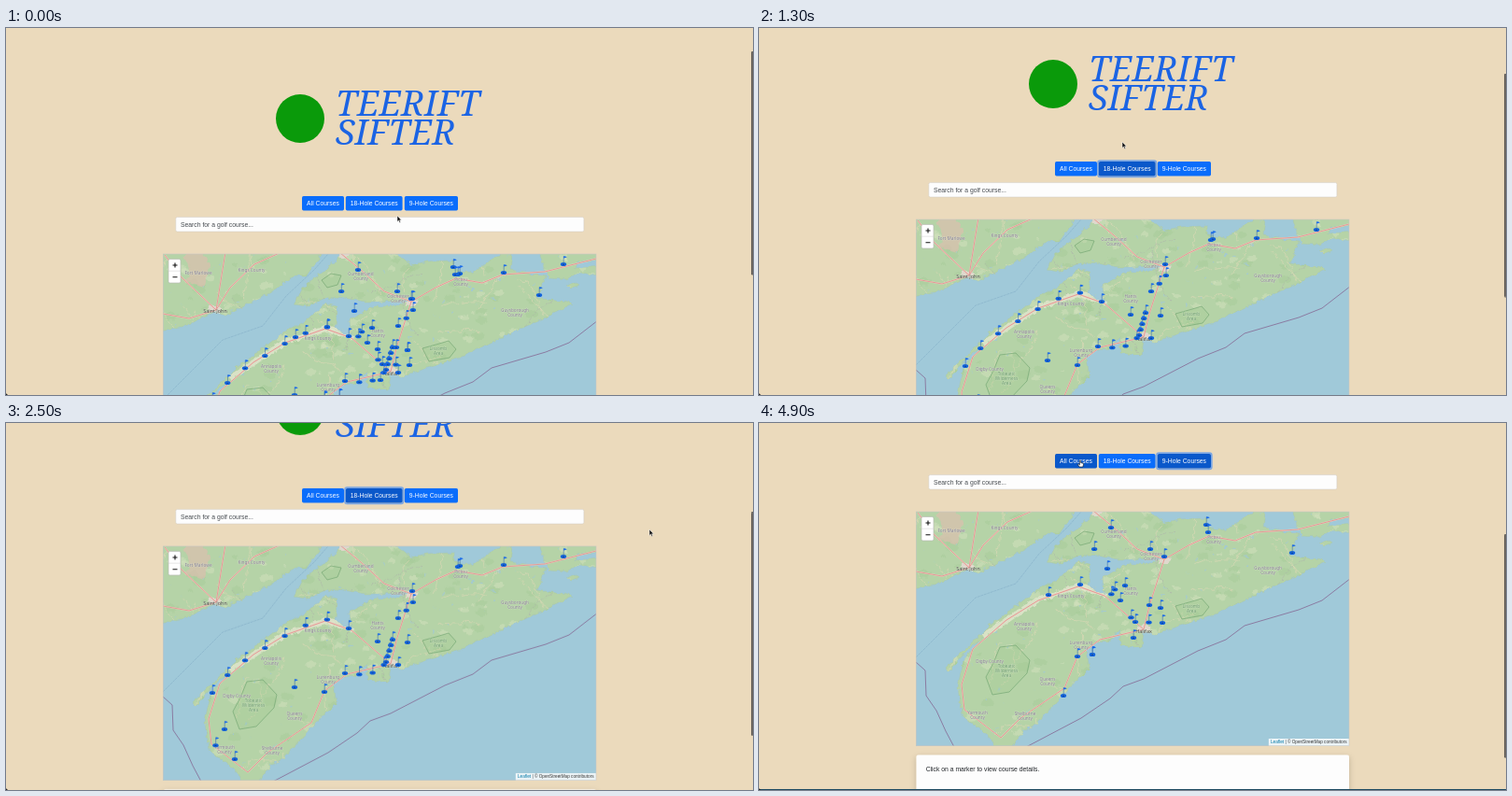
Recreate the animation shown at these times as an HTML page. Size 800 by 393 pixels, loop 5000 ms.

```html
<!DOCTYPE html>
<html lang="en">
<head>
<meta charset="utf-8">
<title>Teerift Sifter</title>
<style>
  html, body { margin: 0; width: 100%; height: 100%; overflow: hidden; background: #ebdabc; }
  svg { display: block; width: 800px; height: 393px; font-family: "Liberation Sans", Arial, sans-serif; }
  .title { font: italic 37.7px "Noto Serif", serif; fill: #1b64e4; }
  .ui { font-size: 6.8px; }
  .label { font: 4.7px "Noto Sans", sans-serif; fill: #82788f; text-anchor: middle;
    paint-order: stroke; stroke: #e6efdc; stroke-width: .7px; stroke-opacity: .6; }
  .town { fill: #3c3c3c; font-size: 5.4px; }
  .park { fill: #5d9260; }
  .line { fill: none; stroke-linejoin: round; }
</style>
</head>
<body>
<svg viewBox="0 0 800 393">
  <defs>
    <clipPath id="frame"><rect x="168.5" y="95" width="463.5" height="250.5"/></clipPath>
    <clipPath id="shore"></clipPath>
    <filter id="rough" filterUnits="userSpaceOnUse" x="160" y="85" width="480" height="275">
      <feTurbulence type="fractalNoise" baseFrequency=".18" numOctaves="2" seed="4"/>
      <feDisplacementMap in="SourceGraphic" scale="6" xChannelSelector="R" yChannelSelector="G"/>
    </filter>
    <filter id="soft" x="-10%" y="-30%" width="120%" height="160%">
      <feDropShadow dx="0" dy="2" stdDeviation="3" flood-opacity=".18"/>
    </filter>
    <g id="pin">
      <ellipse rx="3.2" ry="2" fill="#1263dc"/>
      <ellipse cy=".2" rx="1" ry=".6" fill="#0a3c93"/>
      <path d="M.2 0V-8.4" stroke="#3a6cb0" stroke-width=".6"/>
      <path d="M.2-8.8Q1.8-9 3.8-7.7Q2.2-7 .2-6.5Z" fill="#1769ec"/>
    </g>
  </defs>

  <g id="page">
    <circle cx="315" cy="-50" r="26" fill="#0a9a0a"/>
    <text class="title" x="353" y="-53">TEERIFT</text>
    <text class="title" x="353" y="-22">SIFTER</text>

    <g id="buttons" class="ui"></g>

    <rect x="181.8" y="55.6" width="437.1" height="15.4" rx="1.7" fill="#fdfdfd" stroke="#cfcbc4" stroke-width=".5"/>
    <text class="ui" x="187" y="65.7" fill="#464b50">Search for a golf course...</text>

    <g clip-path="url(#frame)">
      <rect x="168" y="94" width="465" height="252" fill="#a0c9d9"/>
      <g id="sea"></g>
      <g id="land" filter="url(#rough)"></g>
      <g id="over"></g>
      <g id="names"></g>
      <g id="pins18"></g>
      <g id="pins9"></g>
      <rect x="545.8" y="338" width="87" height="8" fill="#fff" fill-opacity=".8"/>
      <text x="548" y="343.4" font-size="4.7" fill="#333"><tspan fill="#0078a8">Leaflet</tspan> | © OpenStreetMap contributors</text>
    </g>
    <rect x="168.5" y="95" width="463.5" height="250.5" fill="none" stroke="#c9c6c2" stroke-width=".6"/>
    <rect x="174" y="100.4" width="13" height="25.6" rx="1.7" fill="#fff" stroke="#b9bbb6" stroke-width=".7"/>
    <path d="M174 113.2h13" stroke="#ccc" stroke-width=".5"/>
    <path d="M178.5 107h5M181 104.5v5M178.5 119.8h5" stroke="#111" stroke-width="1.1"/>

    <rect x="168.5" y="355.5" width="463.5" height="60" rx="2" fill="#fdfdfd" filter="url(#soft)"/>
    <text class="ui" x="178.7" y="373" fill="#212529">Click on a marker to view course details.</text>
    <rect y="392" width="800" height="4" fill="#1f4b62"/>
  </g>

  <path d="M0 391.2L2 393H0Z" fill="#222"/>
  <rect id="thumb" x="798" width="3.4" height="239.5" rx="1.2" fill="#6b665f"/>
  <g id="cursor">
    <path id="arrow" d="M0 0V6.4L1.5 5.1L2.5 7.4L3.6 6.9L2.6 4.7H4.5Z" fill="#111" stroke="#fff" stroke-width=".5"/>
    <path id="hand" d="M-.6.4Q0-.4.6.4V2.6L3 3.2Q3.7 3.5 3.5 4.4L2.8 7H-.9L-2.6 4.6Q-2.5 3.7-1.6 4.1L-.6 4.9Z" fill="#fff" stroke="#111" stroke-width=".6"/>
  </g>
</svg>

<script>
const LOOP = 5000, BOTTOM = 147;
const $ = id => document.getElementById(id);

function add(parent, tag, attrs, text) {
  const el = document.createElementNS("http://www.w3.org/2000/svg", tag);
  for (const k in attrs) el.setAttribute(k, attrs[k]);
  if (text) el.textContent = text;
  parent.append(el);
  return el;
}

const line = (parent, points, stroke, width, dash = "none") =>
  add(parent, "polyline", { class: "line", points, stroke, "stroke-width": width, "stroke-dasharray": dash });

let seed = 71;
const rnd = (lo, hi) => lo + (hi - lo) * (seed = seed * 16807 % 2147483647) / 2147483647;

// Key points of the coasts; the displacement filter adds the small bays
for (const points of [
  "357,97 346,110 333,118 316,133 308,149 322,151 340,143 355,141 386,146 434,145 417,151 395,151 367,166 370,184 353,174 354,151 342,148 319,168 299,178 264,204 247,217 213,249 201,262 204,265 226,240 240,230 228,243 219,255 213,282 217,313 227,321 244,333 257,353 269,348 285,329 297,322 317,301 338,277 354,264 351,243 363,234 374,235 387,220 387,238 410,241 412,222 421,227 453,216 488,205 531,184 580,162 608,148 569,142 578,119 561,116 540,112 543,88 518,102 499,116 480,111 480,102 451,103 434,107 421,96 400,92 360,88",
  "160,85 340,85 338,96 330,106 321,119 308,119 291,131 264,146 235,161 224,156 192,172 160,178",
  "569,85 640,85 640,101 612,103 610,110 640,108 640,119 616,115 600,122 581,121 577,112",
  "600,129 608,125 614,129 606,132"
]) {
  add($("land"), "polygon", { points, fill: "#b5d3a7", stroke: "#a9c4a4", "stroke-width": .4 });
  add($("shore"), "polygon", { points });
}

// Fields, woods, lakes, small roads and county borders
const detail = add($("land"), "g", { "clip-path": "url(#shore)" });
function scatter(n, fill, size, opacity) {
  while (n--) {
    const r = size * rnd(.3, 1.3);
    add(detail, "ellipse", { cx: rnd(168, 632), cy: rnd(95, 345), rx: r, ry: r * .6, fill, opacity });
  }
}
function wander(n, steps, stride, stroke, width, dash) {
  while (n--) {
    let x = rnd(168, 632), y = rnd(95, 345), turn = rnd(0, 6.3), points = "";
    for (let i = 0; i < steps; i++) {
      points += `${x},${y} `;
      turn += rnd(-.5, .5);
      x += stride * Math.cos(turn);
      y += stride * Math.sin(turn);
    }
    line(detail, points, stroke, width, dash);
  }
}
scatter(170, "#d9e4c3", 5, .4);
scatter(150, "#a5cb98", 6, .45);
scatter(240, "#a0c9d9", 1.2, .8);
wander(60, 7, 8, "#e6d9b8", .5, "none");
wander(14, 4, 20, "#a79cad", .4, "2 1");

line(detail, "240,228 299,189 345,174 372,186", "#e9e8d3", 6).setAttribute("opacity", .7);
line(detail, "198,92 208,108 202,128", "#dcbfae", 20).setAttribute("opacity", .7);
for (const [cx, cy] of [[413, 220], [224, 154], [360, 96], [434, 147]])
  add(detail, "ellipse", { cx, cy, rx: 7, ry: 4, fill: "#dfd8cd" });

// Parks
for (const points of [
  "446,196 464,191 474,188 482,197 475,206 453,210",
  "258,240 275,238 290,254 287,268 268,288 250,291 243,272 251,257",
  "338,123 348,116 359,118 355,128 344,131"
]) add($("over"), "polygon", { points, fill: "#9ac78d", "fill-opacity": .25, stroke: "#76a875", "stroke-width": .7 });

// Main roads
const roads = [
  "412,221 418,196 434,146 405,135 380,112 358,94",
  "434,146 460,131 482,121 510,126 532,117 577,114 632,100",
  "412,221 370,185 342,175 299,190 265,211 229,242 217,280 220,307 259,337",
  "412,221 365,232 341,250 327,284 280,316 259,337",
  "168,159 196,164 225,155 240,131 266,106 295,93",
  "235,93 225,155 188,120 170,96"
];
for (const p of roads) line($("over"), p, "#f1d3c2", 1.4);
for (const p of roads) line($("over"), p, "#dc8185", .7);

// Sea borders
line($("sea"), "168,251 232,187 275,172 300,140 330,112 345,95", "#85afc8", .6, "3 .7");
for (const p of [
  "634,166 603,190 578,200 520,217 500,232 470,244 412,274 390,282 376,295 345,316 286,347",
  "168,256 178,265 179,292 190,308 200,330 209,347"
]) line($("over"), p, "#8b7ca2", 1);

// Place names: x, y, lines split by "/", style
for (const [x, y, text, style = ""] of [
  [263, 114, "Kings County"], [206, 117, "Fort Marlowe"], [224, 158, "Saint John", "town"],
  [380, 118, "Cumberland/County"], [334, 187, "Kings County"], [284, 217, "Annapolis/County"],
  [345, 237, "Lunenburg/County"], [247, 257, "Digby County"], [309, 276, "Queens/County"],
  [265, 262, "Tobeatic/Wilderness/Area", "park"], [398, 179, "Hants/County"],
  [420, 142, "Colchester/County"], [412, 225, "Halifax", "town"], [487, 124, "Pictou/County"],
  [545, 157, "Guysborough/County"], [234, 312, "Yarmouth/County"], [285, 313, "Shelburne/County"],
  [463, 198, "Liscomb/Area", "park"]
]) text.split("/").forEach((s, i) =>
  add($("names"), "text", { class: "label " + style, x, y: y + i * 5.2 }, s));

// Course markers: n of them evenly spaced along a route
function along(parent, points, n) {
  const route = line($("over"), points, "none", 0);
  const step = route.getTotalLength() / (n - 1);
  for (let i = 0; i < n; i++) {
    const { x, y } = route.getPointAtLength(i * step);
    add(parent, "use", { href: "#pin", x, y });
  }
  route.remove();
}
for (const [points, n] of [
  ["221,252 245,224 310,184 340,172 367,183", 8],
  ["484,117 533,115", 2], ["486,116 597,106", 2],
  ["435,143 436,157 420,172", 4],
  ["414,195 411,205 407,219", 5],
  ["398,197 430,198", 2],
  ["363,231 390,233 402,222 420,222", 5],
  ["341,251 309,246", 2],
  ["234,291 220,305 245,323", 3]
]) along($("pins18"), points, n);
for (const [points, n] of [
  ["377,112 356,139 373,156", 3],
  ["479,109 481,117", 2],
  ["419,135 434,143", 2],
  ["571,139 430,198", 2],
  ["310,184 344,173", 2],
  ["392,174 374,181 387,190", 4],
  ["418,195 396,210 401,230", 3],
  ["403,213 432,214", 3],
  ["341,250 357,248", 2],
  ["357,248 326,292", 2]
]) along($("pins9"), points, n);

// Motion
function play(el, prop, rows, easing) {
  el.animate(rows.map(([t, v]) => ({ offset: t / LOOP, [prop]: v, easing })),
    { duration: LOOP, iterations: Infinity });
}
const hold = (el, prop, rows) =>
  play(el, prop, [...rows, [LOOP, rows[rows.length - 1][1]]], "steps(1, end)");

// Each move is [from, to, x, y]; the element rests in between
function travel(el, x, y, moves, easing) {
  const rows = [[0, `translate(${x}px, ${y}px)`]];
  for (const [from, to, nx, ny] of moves) {
    rows.push([from, rows[rows.length - 1][1]], [to, `translate(${nx}px, ${ny}px)`]);
  }
  play(el, "transform", [...rows, [LOOP, rows[rows.length - 1][1]]], easing);
}

const BLUE = "#0a6dfb", DARK = "#0a58ca";
for (const [x, w, text, fills, rings] of [
  [317, 45, "All Courses", [[0, BLUE], [4080, DARK]], [[0, 0]]],
  [363.8, 60.8, "18-Hole Courses", [[0, BLUE], [300, DARK], [3700, BLUE], [3900, DARK], [4060, BLUE]],
    [[0, 0], [700, 1], [3700, 0]]],
  [426.8, 57.2, "9-Hole Courses", [[0, BLUE], [3400, DARK]], [[0, 0], [3700, 1]]]
]) {
  const ring = add($("buttons"), "rect", { x: x - .8, y: 32.2, width: w + 1.6, height: 17.1, rx: 2.4,
    fill: "none", stroke: "#3184fd", "stroke-opacity": .6, "stroke-width": 1.7 });
  const box = add($("buttons"), "rect", { x, y: 33, width: w, height: 15.5, rx: 1.7 });
  add($("buttons"), "text", { x: x + w / 2, y: 43.1, fill: "#fff", "text-anchor": "middle" }, text);
  hold(ring, "opacity", rings);
  hold(box, "fill", fills);
}

hold($("pins18"), "opacity", [[0, 1], [3700, 0]]);
hold($("pins9"), "opacity", [[0, 1], [700, 0], [3700, 1]]);

const scroll = [[200, 450, 2.5], [800, 1250, 37], [1350, 1800, 57], [1950, 2500, 110], [2500, 2950, BOTTOM]];
travel($("page"), 0, BOTTOM, scroll.map(([from, to, s]) => [from, to, 0, BOTTOM - s]), "linear");
travel($("thumb"), 0, 25, scroll.map(([from, to, s]) => [from, to, 0, 25 + s * .64]), "linear");

travel($("cursor"), 419, 201, [
  [100, 450, 393, 184], [800, 1250, 389, 122], [1350, 1850, 619, 115], [1950, 2400, 689, 114],
  [2550, 3000, 474, 17], [3100, 3500, 455, 40], [3800, 4150, 344, 40]
], "ease-in-out");
hold($("hand"), "opacity", [[0, 0], [300, 1], [950, 0], [3400, 1]]);
hold($("arrow"), "opacity", [[0, 1], [300, 0], [950, 1], [3400, 0]]);
</script>
</body>
</html>
```
